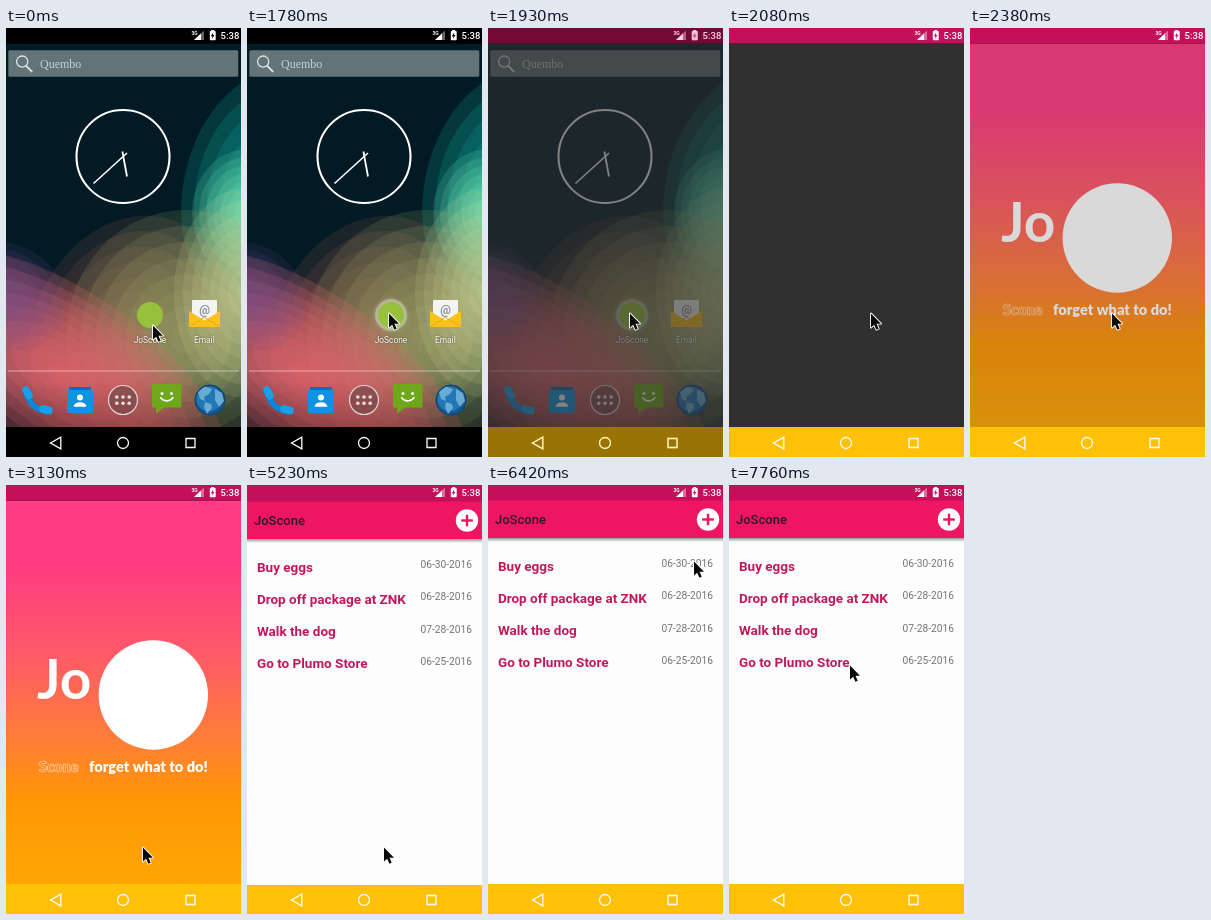
These frames come from a looping animation (235 px wide and 429 px high, 8 s). An HTML page with a canvas:

```html
<!DOCTYPE html>
<html lang="en">
<head>
<meta charset="utf-8">
<title>To-do app launch</title>
<style>
html, body { margin: 0; width: 100%; height: 100%; overflow: hidden; background: #000; }
canvas { display: block; width: 235px; height: 429px; }
</style>
</head>
<body>
<canvas id="stage"></canvas>
<script>
const W = 235, H = 429, LOOP = 8000, TOP = 15.5, NAV = 399;
const APP = 'JoScone';
const SANS = 'Roboto, "Open Sans", sans-serif';
const ROUND = 'Lato, "Open Sans", sans-serif';

const canvas = document.getElementById('stage');
const dpr = window.devicePixelRatio || 1;
canvas.width = W * dpr;
canvas.height = H * dpr;
const g = canvas.getContext('2d');
g.scale(dpr, dpr);

// Pointer moves: first step, last step, number of steps, target
const START = [147, 297];
const MOVES = [
  [1050, 1190, 2, 142, 285],
  [2980, 3130, 2, 137, 362],
  [5820, 6420, 5, 206, 76],
  [6710, 7610, 7, 124, 172],
  [7760, 7760, 1, 121, 180]
];

const ITEMS = [
  ['Buy eggs', '06-30-2016'],
  ['Drop off package at ZNK', '06-28-2016'],
  ['Walk the dog', '07-28-2016'],
  ['Go to Plumo Store', '06-25-2016']
];

function rect(x, y, w, h, color) {
  g.fillStyle = color;
  g.fillRect(x, y, w, h);
}

function box(x, y, w, h, r, color) {
  g.beginPath();
  g.roundRect(x, y, w, h, r);
  g.fillStyle = color;
  g.fill();
}

function disc(x, y, r, color) {
  g.beginPath();
  g.arc(x, y, r, 0, Math.PI * 2);
  g.fillStyle = color;
  g.fill();
}

function ring(x, y, r, color, width) {
  g.beginPath();
  g.arc(x, y, r, 0, Math.PI * 2);
  g.strokeStyle = color;
  g.lineWidth = width;
  g.stroke();
}

function trace(pts, close) {
  g.beginPath();
  pts.forEach(([x, y]) => g.lineTo(x, y));
  if (close) g.closePath();
}

function poly(pts, color) {
  trace(pts, true);
  g.fillStyle = color;
  g.fill();
}

function line(pts, color, width, close) {
  trace(pts, close);
  g.strokeStyle = color;
  g.lineWidth = width;
  g.stroke();
}

function text(str, x, y, font, color, align = 'left') {
  g.font = font;
  g.textAlign = align;
  g.fillStyle = color;
  g.fillText(str, x, y);
}

function vertical(y0, y1, colors) {
  const grad = g.createLinearGradient(0, y0, 0, y1);
  colors.forEach(([at, c]) => grad.addColorStop(at, c));
  return grad;
}

// Stacked translucent ellipses give a banded glow
function glow(x, y, rx, ry, tilt, color, alpha, bands) {
  g.save();
  g.globalAlpha *= alpha;
  g.fillStyle = color;
  for (let i = bands; i > 0; i--) {
    g.beginPath();
    g.ellipse(x, y, rx * i / bands, ry * i / bands, tilt, 0, Math.PI * 2);
    g.fill();
  }
  g.restore();
}

function statusBar(color, height = TOP) {
  rect(0, 0, W, height, color);
  text('3G', 185.5, 7, `700 5px ${SANS}`, '#fff');
  poly([[188, 12], [198, 12], [198, 2.5]], 'rgba(255,255,255,.4)');
  poly([[188, 12], [195, 12], [195, 5.4]], '#fff');
  rect(205.2, 2, 3, 1.5, '#fff');
  box(203.8, 3, 5.9, 9.2, 0.8, '#fff');
  poly([[207.2, 4.5], [204.8, 8.2], [206.4, 8.2], [206, 10.8], [208.5, 7.1], [207, 7.1]], color);
  text('5:38', 233.3, 11, `500 9.5px ${SANS}`, '#fff', 'right');
}

function navBar(color, top = NAV) {
  rect(0, top, W, H - top, color);
  line([[44.5, 415], [54.8, 409.2], [54.8, 420.8]], '#fff', 1.3, true);
  ring(117, 415, 5.5, '#fff', 1.3);
  line([[180, 410.5], [189, 410.5], [189, 419.5], [180, 419.5]], '#fff', 1.3, true);
}

function wallpaper() {
  rect(0, TOP, W, NAV - TOP, '#021a24');
  g.save();
  g.beginPath();
  g.rect(0, TOP, W, NAV - TOP);
  g.clip();
  glow(265, 165, 88, 125, 0.2, '#0a9690', 0.24, 7);
  glow(242, 185, 56, 64, 0, '#70e6b0', 0.17, 8);
  glow(125, 310, 100, 125, 0.35, '#94564a', 0.17, 8);
  glow(180, 310, 120, 128, 0, '#9ca464', 0.17, 8);
  glow(240, 265, 72, 105, 0, '#e0e09c', 0.13, 8);
  glow(60, 350, 190, 85, 0.61, '#e0666e', 0.23, 9);
  glow(0, 268, 62, 52, 0.5, '#704c92', 0.12, 7);
  rect(0, 350, W, 49, vertical(350, NAV, [[0, 'rgba(20,0,0,0)'], [1, 'rgba(20,0,0,.25)']]));
  g.restore();
}

function searchBar() {
  box(2.3, 22.3, 230, 26.4, 1.5, 'rgba(195,205,205,.5)');
  ring(16.2, 33.6, 5.6, '#dfe5e5', 1.3);
  line([[20.2, 37.8], [26.2, 43.8]], '#dfe5e5', 1.9);
  text('Quembo', 34, 40, '12px "Liberation Serif", serif', '#c8d0d0');
}

function clockFace() {
  ring(117, 128.5, 46.5, '#fff', 2.1);
  line([[121, 125], [87.5, 155.5]], '#fff', 1.6);
  line([[116.4, 123.5], [121, 148.5]], '#fff', 1.8);
}

function label(str, x) {
  g.save();
  g.shadowColor = 'rgba(0,0,0,.6)';
  g.shadowBlur = 2;
  text(str, x, 314.8, `8.4px ${SANS}`, '#fff', 'center');
  g.restore();
}

function appIcon(pressed) {
  if (pressed) {
    g.save();
    g.shadowColor = 'rgba(255,255,255,.6)';
    g.shadowBlur = 4 * dpr;
    disc(144, 287, 16, 'rgba(225,225,205,.4)');
    g.restore();
  }
  disc(144, 287, 13, '#97c03d');
  label(APP, 144);
}

function mailIcon() {
  poly([[183, 283], [198.5, 274], [214, 283]], '#d99a10');
  box(186, 272, 25, 22, 1, '#f4f4f2');
  text('@', 198.5, 285.5, `700 12px ${SANS}`, '#8a9298', 'center');
  poly([[183, 283], [198.5, 292.5], [214, 283], [214, 299], [183, 299]], '#fcc21b');
  line([[183.5, 298.5], [198.5, 289.5], [213.5, 298.5]], '#e8a912', 1);
  label('Email', 198.3);
}

function phoneIcon() {
  g.save();
  g.translate(31, 372.5);
  g.lineCap = 'round';
  g.strokeStyle = '#0b86d0';
  g.lineWidth = 6;
  g.beginPath();
  g.moveTo(-11, -10);
  g.quadraticCurveTo(-8, 8, 10, 11);
  g.stroke();
  line([[-11, -10.5], [-8, -5]], '#1a9fe8', 7.5);
  line([[6, 8.5], [12, 10]], '#1a9fe8', 7.5);
  g.restore();
}

function contactsIcon() {
  box(61, 362, 26, 23, 1.5, '#0d93e0');
  rect(63, 359, 22, 3, '#0a6fb0');
  disc(74, 369.5, 3, '#fff');
  g.beginPath();
  g.ellipse(74, 378.8, 6.4, 4.6, 0, Math.PI, 0);
  g.fillStyle = '#fff';
  g.fill();
}

function drawerIcon() {
  disc(117, 372, 14.5, 'rgba(110,70,72,.6)');
  ring(117, 372, 14.5, '#e2d4d4', 1.2);
  for (let i = 0; i < 6; i++) disc(110.8 + (i % 3) * 6.2, i < 3 ? 369 : 375.2, 1.8, '#f4dede');
}

function chatIcon() {
  box(146, 356, 29.5, 23.5, 1.5, '#6ea81a');
  poly([[150, 379], [159, 379], [150, 386]], '#6ea81a');
  disc(156, 365.5, 1.5, '#fff');
  disc(165.5, 365.5, 1.5, '#fff');
  g.beginPath();
  g.arc(160.8, 365.5, 7.4, 0.5, Math.PI - 0.5);
  g.strokeStyle = '#fff';
  g.lineWidth = 1.6;
  g.stroke();
}

function globeIcon() {
  disc(204, 372, 15.3, '#16568f');
  disc(203, 371, 12.5, '#2277b6');
  const land = '#68acd6';
  poly([[192, 364], [199, 358.5], [206, 361], [203, 366], [198, 369], [199, 373], [194, 371]], land);
  poly([[199, 374], [205, 376], [206, 380], [201, 386], [198, 379]], land);
  poly([[209, 361], [216, 365], [218, 373], [213, 379], [209, 372]], land);
  ring(204, 372, 15, '#0d3c68', 0.8);
}

function home(pressed) {
  wallpaper();
  searchBar();
  clockFace();
  appIcon(pressed);
  mailIcon();
  rect(2, 342.5, 231, 1, 'rgba(255,255,255,.5)');
  phoneIcon();
  contactsIcon();
  drawerIcon();
  chatIcon();
  globeIcon();
  statusBar('#000');
  navBar('#000');
}

function appFrame(dy = 0) {
  statusBar('#c40f5b', TOP + dy);
  navBar('#ffc107', NAV + dy);
}

function blank() {
  rect(0, TOP, W, NAV - TOP, '#303030');
  appFrame();
}

function splash(dim) {
  rect(0, TOP, W, NAV - TOP, vertical(TOP, NAV, [
    [0, '#ff3b83'], [0.17, '#ff3b80'], [0.4, '#ff5a68'], [0.62, '#ff7d38'], [0.78, '#ff9604'], [1, '#ffa604']
  ]));
  text('Jo', 31, 214, `700 55px ${ROUND}`, '#fff');
  disc(147.3, 210, 54.7, '#fff');
  const font = `900 14.6px ${ROUND}`;
  text('forget what to do!', 83, 287, font, '#fff');
  g.strokeStyle = 'rgba(255,255,255,.75)';
  g.lineWidth = 0.6;
  g.strokeText('Scone', 33, 287);
  if (dim) rect(0, TOP, W, NAV - TOP, 'rgba(48,48,48,.18)');
  appFrame();
}

function list(dy) {
  rect(0, TOP, W, H - TOP, '#fdfdfd');
  g.save();
  g.translate(0, dy);
  rect(0, 53, W, 4, vertical(53, 57, [[0, 'rgba(0,0,0,.4)'], [1, 'rgba(0,0,0,0)']]));
  rect(0, 15, W, 38, '#ee1562');
  text(APP, 7, 39.3, `500 13px ${SANS}`, '#2c1a22');
  disc(220, 34.5, 11.2, '#fff');
  rect(214.2, 33.3, 11.6, 2.4, '#ee1562');
  rect(218.8, 28.7, 2.4, 11.6, '#ee1562');
  ITEMS.forEach(([name, date], i) => {
    const y = 85.5 + i * 32.2;
    text(name, 10, y, `700 13.5px ${SANS}`, '#c2185b');
    text(date, 225, y - 3.4, `10.2px ${SANS}`, '#757575', 'right');
  });
  g.restore();
  appFrame(dy);
}

function pointerAt(t) {
  let [x, y] = START;
  for (const [t0, t1, n, tx, ty] of MOVES) {
    if (t < t0) break;
    const gap = n > 1 ? (t1 - t0) / (n - 1) : 1;
    const p = Math.min(n, Math.floor((t - t0) / gap) + 1) / n;
    const e = p * p * (3 - 2 * p);
    x += (tx - x) * e;
    y += (ty - y) * e;
  }
  return [x, y];
}

function pointer(t) {
  const [x, y] = pointerAt(t);
  const shape = [[0, 0], [0, 14], [3.2, 11.2], [5.4, 16.2], [7.7, 15.2], [5.5, 10.2], [10, 10.2]];
  g.save();
  g.translate(x, y + 0.5);
  g.lineJoin = 'round';
  line(shape, '#fff', 1.8, true);
  poly(shape, '#080808');
  g.restore();
}

function scene(t) {
  if (t < 2080) {
    home(t >= 1640);
    if (t >= 1930) {
      g.save();
      g.globalAlpha = 0.6;
      blank();
      g.restore();
    }
  } else if (t < 2380) blank();
  else if (t < 5230) splash(t < 2530);
  else list(t < 5370 ? 1 : 0);
}

function draw() {
  const t = performance.now() % LOOP;
  g.clearRect(0, 0, W, H);
  scene(t);
  pointer(t);
  requestAnimationFrame(draw);
}
draw();
</script>
</body>
</html>
```
